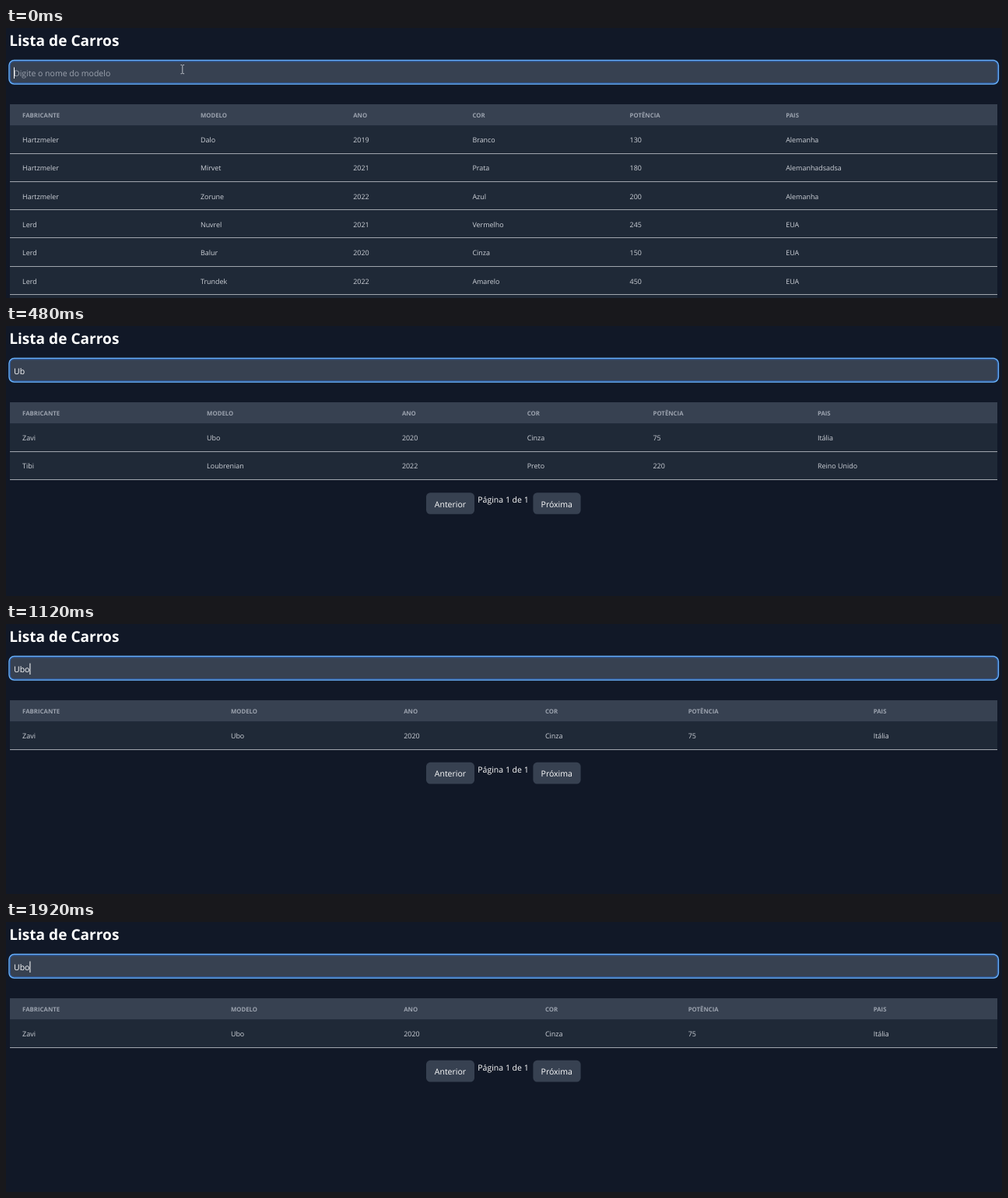
Recreate the animation shown at these times as an HTML page. Size 1280 by 347 pixels, loop 2000 ms.

```html
<!DOCTYPE html>
<html lang="pt">
<head>
<meta charset="utf-8">
<title>Lista de Carros</title>
<style>
  html, body { margin: 0; width: 100%; height: 100%; overflow: hidden; background: #111827; }
  svg { display: block; width: 100%; height: 100%; font-family: "Open Sans", "Noto Sans", sans-serif; text-rendering: geometricPrecision; }
  text { white-space: pre; }
  .title { font-size: 19.1px; font-weight: 700; fill: #fff; }
  .head { font-size: 7.8px; font-weight: 700; fill: #9ca3af; }
  .cell { font-size: 8.95px; fill: #cdd1d8; }
  .ui { font-size: 10.5px; fill: #fff; }
  .hint { fill: #9ca3af; }
</style>
</head>
<body>
<svg viewBox="0 0 1280 347">
  <rect width="1280" height="347" fill="#111827"/>
  <text class="title" x="4.2" y="22.6">Lista de Carros</text>

  <rect x="4" y="41.6" width="1271.4" height="30.4" rx="6.5" fill="#374151" stroke="#68b0f8" stroke-width="1.5"/>
  <rect x="5.2" y="42.8" width="1269" height="28" rx="5.4" fill="none" stroke="#2c62b8" stroke-width=".9"/>
  <text id="query" x="10" y="61.8"></text>
  <rect id="caret" y="50.5" width="1" height="14.5" fill="#fff"/>
  <path id="pointer" d="M224.5 47.5h1.5l.8.8.8-.8h1.5M226.8 48.3v9.6M224.5 58.7h1.5l.8-.8.8.8h1.5" fill="none" stroke="#b9bec6" stroke-width="1"/>

  <g id="table"></g>
  <g id="pager">
    <rect x="540" width="62" height="27.6" rx="5.2" fill="#374151"/>
    <text class="ui" x="550.8" y="18.6">Anterior</text>
    <text class="ui" x="606.3" y="13.2">Página 1 de 1</text>
    <rect x="677.4" width="61.2" height="27.6" rx="5.2" fill="#374151"/>
    <text class="ui" x="687.6" y="18.6">Próxima</text>
  </g>
</svg>
<script>
const LOOP = 2000, LEFT = 5, WIDTH = 1269, HEAD_Y = 98, BODY_Y = 125.2, ROW_H = 36.27;
const heads = ["FABRICANTE", "MODELO", "ANO", "COR", "POTÊNCIA", "PAIS"];
const cars = [
  ["Hartzmeler", "Dalo", 2019, "Branco", 130, "Alemanha"],
  ["Hartzmeler", "Mirvet", 2021, "Prata", 180, "Alemanhadsadsa"],
  ["Hartzmeler", "Zorune", 2022, "Azul", 200, "Alemanha"],
  ["Lerd", "Nuvrel", 2021, "Vermelho", 245, "EUA"],
  ["Lerd", "Balur", 2020, "Cinza", 150, "EUA"],
  ["Lerd", "Trundek", 2022, "Amarelo", 450, "EUA"],
  ["Hanoki", "Zitur", 2020, "Preto", 230, "Japão"],
  ["Zavi", "Ubo", 2020, "Cinza", 75, "Itália"],
  ["Tibi", "Loubrenian", 2022, "Preto", 220, "Reino Unido"]
];
// Each keystroke: start time, typed text, column positions
const steps = [
  { at: 0, typed: "", cols: [21.1, 249.9, 446.2, 599.4, 801.6, 1002.2] },
  { at: 80, typed: "U", cols: [21.1, 257.5, 494.7, 645.7, 846.6, 1045.6] },
  { at: 480, typed: "Ub", cols: [21.1, 258.1, 508.9, 669.7, 831.5, 1042.9] },
  { at: 880, typed: "Ubo", cols: [21.1, 288.9, 511.2, 692.9, 876.7, 1114.7] }
];
const caretOff = [[480, 880], [1360, 1840]];

const [query, caret, pointer, table, pager] =
  ["query", "caret", "pointer", "table", "pager"].map(id => document.getElementById(id));

const bar = (y, h, fill) => `<rect x="${LEFT}" y="${y}" width="${WIDTH}" height="${h}" fill="${fill}"/>`;
const line = (cls, cols, y, words) =>
  words.map((w, i) => `<text class="${cls}" x="${cols[i]}" y="${y}">${w}</text>`).join("");
const show = (el, on) => el.setAttribute("visibility", on ? "visible" : "hidden");

function renderTable({ typed, cols }) {
  const found = cars.filter(car => car[1].toLowerCase().includes(typed.toLowerCase()));
  const bottom = BODY_Y + found.length * ROW_H;
  table.innerHTML =
    bar(BODY_Y, bottom - BODY_Y, "#1f2937") +
    bar(HEAD_Y, BODY_Y - HEAD_Y, "#374151") +
    line("head", cols, 115, heads) +
    found.map((car, i) => {
      const y = BODY_Y + i * ROW_H;
      return bar(Math.floor(y + ROW_H - .4), 1, "#a0a5ad") + line("cell", cols, y + 22, car);
    }).join("");
  pager.setAttribute("transform", `translate(0 ${bottom + 16.4})`);
}

let current;
function draw(time) {
  const t = time % LOOP;
  const step = steps.findLast(s => t >= s.at);
  if (step !== current) {
    current = step;
    renderTable(step);
    query.textContent = step.typed || "Digite o nome do modelo";
    query.setAttribute("class", step.typed ? "ui" : "ui hint");
    caret.setAttribute("x", step.typed ? 10 + query.getComputedTextLength() : 10);
    show(pointer, !step.typed);
  }
  show(caret, !caretOff.some(([from, to]) => t >= from && t < to));
}

const start = performance.now();
(function tick() {
  draw(performance.now() - start);
  requestAnimationFrame(tick);
})();
</script>
</body>
</html>
```
